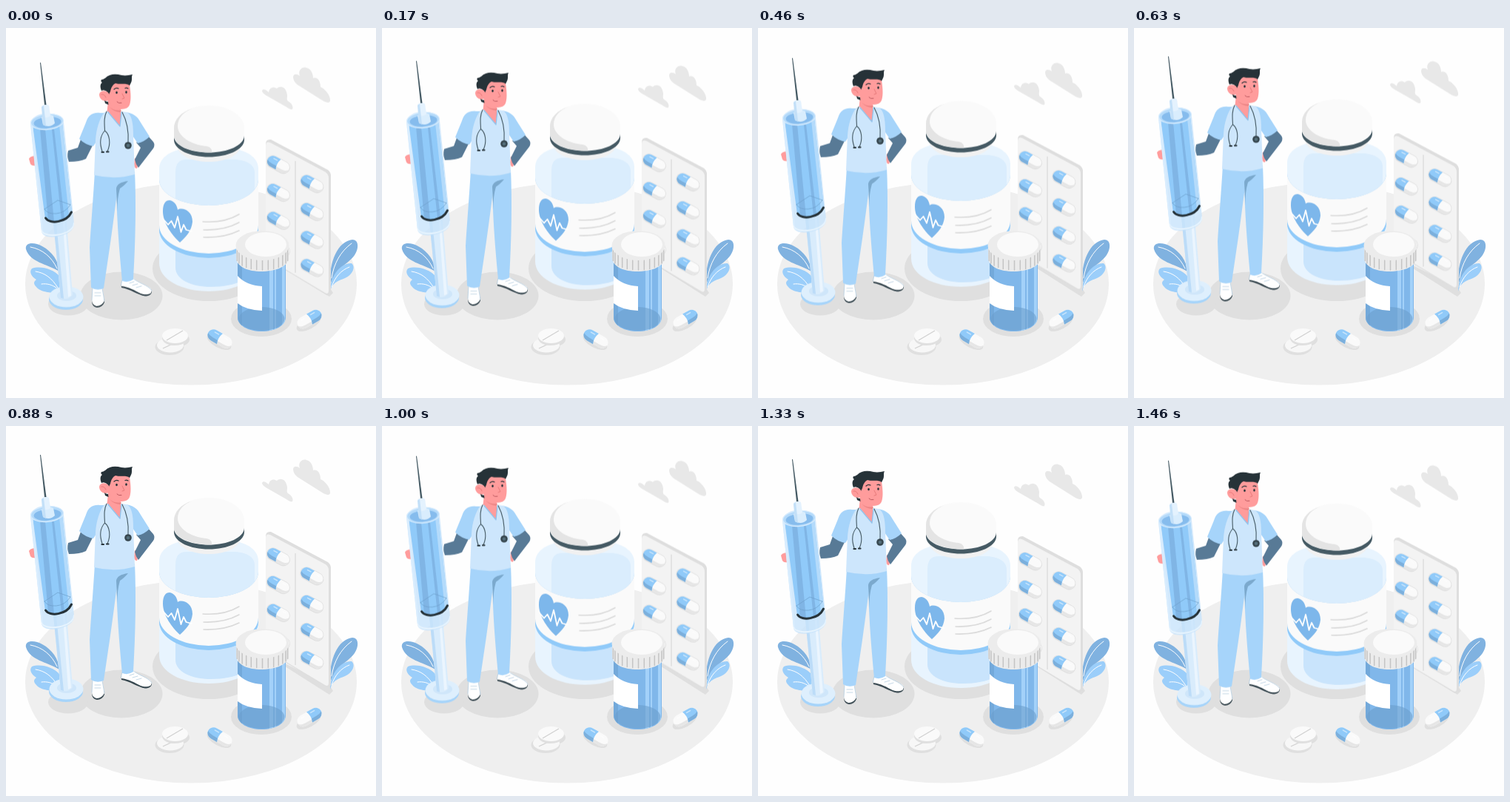
Write an HTML page that moves like this. It is 500 px wide and 500 px high and loops after 1500 ms.

```html
<!DOCTYPE html>
<html lang="en">
<head>
<meta charset="utf-8">
<title>Pharmacy</title>
<style>
html, body { margin: 0; width: 100%; height: 100%; overflow: hidden; background: #fefefe; }
svg { display: block; width: 100%; height: 100%; }
.line { fill: none; stroke-linecap: round; stroke-linejoin: round; }
</style>
</head>
<body>
<svg viewBox="0 0 500 500">
<defs>
  <g id="capsule">
    <rect x="-16" y="-7.6" width="32" height="15.2" rx="7.6" fill="#fafafa"/>
    <path d="M-1 7.6H8.4A7.6 7.6 0 0 0 16 0C14 3.5 10 4 7 4H-1Z" fill="#e6e6e6"/>
    <path d="M0-7.6H-8.4A7.6 7.6 0 0 0-8.4 7.6H0Q-3 0 0-7.6Z" fill="#90caf9"/>
    <path d="M-15.9 1A7.6 7.6 0 0 0-8.4 7.6H0Q-1.4 5-1.5 3H-8Q-13 3-15.9 1Z" fill="#7bafdc"/>
    <path class="line" d="M-9-4.2H-4M5-4.2H9" stroke="#fff" stroke-width="1.5" opacity=".5"/>
  </g>
  <g id="blisterPill">
    <rect x="-17" y="-8.3" width="34" height="17.4" rx="8.7" fill="#e0e0e0"/>
    <use href="#capsule"/>
  </g>
  <clipPath id="jar"><path d="M236 164C220 168 207 176 207 191V318C207 340 237 356 274 356S341 340 341 318V191C341 176 328 168 312 164Z"/></clipPath>
  <clipPath id="vial"><path d="M313 308V391C313 402 327 410 345.5 410S378 402 378 391V308Z"/></clipPath>
  <clipPath id="barrel"><path d="M33 130C34 120 46 115 57 116C69 116 77 120 78 128L92 264C93 274 82 280 70 282C59 284 49 282 48 275Z"/></clipPath>
</defs>

<!-- floor, shadows, leaves -->
<ellipse cx="250" cy="346" rx="224" ry="136.5" fill="#efefef"/>
<g fill="#dfdfdf">
  <ellipse cx="156" cy="362" rx="55.5" ry="32.5"/>
  <ellipse cx="84" cy="373" rx="27" ry="15.5"/>
  <ellipse cx="274" cy="325" rx="76" ry="44"/>
  <ellipse cx="345" cy="393" rx="41" ry="24"/>
  <path d="M352 309L437 363L442 358L437 350Z"/>
</g>
<g fill="#80b2e0">
  <path d="M72 329C54 318 33 317 27 299C25 289 39 289 49 295C62 302 71 314 72 329Z"/>
  <path d="M438 348C436 315 449 288 468 286C477 286 477 298 471 307C461 321 445 323 438 348Z"/>
</g>
<g fill="#9bcefa">
  <path d="M74 356C62 360 45 356 41 350C37 346 37 343 41 340C34 336 31 329 35 325C47 321 64 326 72 335Z"/>
  <path d="M438 356C438 334 453 317 467 318C473 323 468 333 460 337C450 342 442 342 438 356Z"/>
</g>
<g class="line" stroke="#fff">
  <path d="M33 296C50 299 62 310 69 325M40 329C53 331 62 338 70 351M48 346C56 345 62 347 68 351"/>
  <path d="M467 291C452 302 443 318 440 338M464 323C453 327 444 337 440 350"/>
</g>

<g id="float">
  <!-- clouds -->
  <g fill="#e8e8e8">
    <path d="M346 85C347 82 351 83 355 87C356 80 362 79 366 82C371 77 379 80 380 91C380 95 379 97 381 99C385 101 389 106 387 110C385 111 382 109 379 107L351 91C348 89 346 87 346 85Z"/>
    <path d="M388 66C389 62 393 62 397 65C394 58 400 52 406 54C412 55 415 62 415 68C421 66 425 72 425 80C431 82 439 92 438 99C437 102 433 101 429 99L394 77C390 74 388 70 388 66Z"/>
  </g>

  <!-- blister -->
  <path d="M351 157Q351 150 358 151L435 192Q439 195 439 200V356Q439 362 433 361L354 313Q351 311 351 306Z" fill="#dedede"/>
  <path d="M351 159Q351 153 357 155L432 195Q436 198 436 203V355Q436 361 431 358L354 312Q351 310 351 305Z" fill="#f3f3f3"/>
  <path d="M391 180V331" stroke="#dadada" stroke-width="1.3"/>
  <g id="pills"></g>

  <!-- jar -->
  <g clip-path="url(#jar)">
    <path d="M200 160H345V360H200Z" fill="#e8f4fe"/>
    <path d="M229 245V196C229 183 234 178 244 178H306C325 178 336 185 336 196V245Z" fill="#daedfd"/>
    <path d="M229 285V324C229 340 250 350 277 350C311 350 336 338 336 320V270Z" fill="#c9e4fc"/>
    <path d="M207 205A67 35 0 0 0 341 205V273A67 38 0 0 1 207 273Z" fill="#90caf9"/>
    <path d="M207 205A67 35 0 0 0 341 205V267A67 38 0 0 1 207 267Z" fill="#fafafa"/>
  </g>
  <path d="M235 290C225 281 212 264 212 248C212 237 216 233 221 233C227 234 231 239 232 246C237 242 252 246 252 262C251 274 243 283 235 290Z" fill="#7db7eb"/>
  <path class="line" d="M212 258L219 266L223.5 261L228 270L232 255L236.5 276L240 266L243.500 273L251 275" stroke="#fff" stroke-width="1.8"/>
  <path class="line" d="M266 262Q295 264 315 252M267 273Q295 274 315 263M267 283Q295 284 315 274" stroke="#dadada" stroke-width="1.6"/>
  <path d="M231 155V160C233 173 252 181 274 181S315 173 317 160V155Z" fill="#f1f1f1"/>
  <path d="M227 146V152C228 165 249 174.500 274 174.500S321 165 322 152V146Z" fill="#455a64"/>
  <path d="M227 136C227 118 248 105 274 105S322 118 322 136V146C321 159 300 168.500 274 168.500S227 159 227 146Z" fill="#fafafa"/>
  <path d="M227 136V146C227 159 250 168.500 278 168.500C279 164 276 161 271 160C249 158 232 146 232 133C232 121 241 113 252 109C236 114 227 124 227 136Z" fill="#e4e4e4"/>

  <!-- trousers and shoes -->
  <path d="M116 367V371Q117 377 123 378Q130 378 133 371V367Z" fill="#37474f"/>
  <path d="M117 350H130L133 369Q129 376.500 122 376Q116 374 116 368Z" fill="#fff"/>
  <path class="line" d="M117 352L116 368M130 352L133 369M120 358H128M120 362H128" stroke="#b4cde0" stroke-width=".8"/>
  <path d="M155.5 347L156 351C168 353 178 361 188 362.500C192 362.500 197 361 197 356Z" fill="#37474f"/>
  <path d="M157 339L171 337C177 344 187 346 194 351C197 353 197.500 357 195 359C191 361 186 360.500 182 359C174 355 166 350 155.500 349Z" fill="#fff"/>
  <path class="line" d="M157 340L155.500 348M171 338C178 345 192 347 197 355M167 345L173 343M171 348L178 346M176 351L183 349" stroke="#b4cde0" stroke-width=".8"/>
  <path d="M145 202L174 194C176 236 175 288 172 340Q165 345 157 342C154 309 150 270 149 216Z" fill="#a6d4fa"/>
  <path d="M120 194H162L151 216C147 247 144 270 141 291L132 352Q123 356 115 351L113 297C115 265 118 228 120 194Z" fill="#a6d4fa"/>
  <path d="M165 207Q150 209 149 217L150.500 248Q150 230 154 217Q159 214 165 207Z" fill="#7ba9cd"/>

  <!-- right arm -->
  <path d="M174 176L181 179L177 190Q173 190 173 184Z" fill="#ff9c9c"/>
  <path d="M191 145L199 154Q202 158 199 163L179 189Q175 184 174 178L182 162L176 155Z" fill="#587a96"/>
  <path d="M161 114C172 115 178 120 182 128L194 147Q187 154 178 156L169 143Z" fill="#a6d4fa"/>

  <!-- left arm -->
  <path d="M101 151L97 162L84 166Q82 174 85 181Q100 181 108 177L118 157Z" fill="#587a96"/>
  <path d="M127 115C116 114 111 119 108 128L99 150Q107 158 118 160L128 145L136 115Z" fill="#a6d4fa"/>

  <!-- neck and shirt -->
  <path d="M138 99L155 108V116L157 132L152 134L136 118Z" fill="#ff9c9c"/>
  <path d="M140 107Q147 113 156 111L155 114Q146 114 140 107Z" fill="#ec8585"/>
  <path d="M133 114L138 113L154 133L156 113L163 114C169 116 172 127 172 145L174 198Q148 206 119 199L121 151C122 137 126 123 133 114Z" fill="#cde6fc"/>
  <path class="line" d="M138 114L154 133L156 114" stroke="#90c3ec" stroke-width="1.3"/>

  <!-- stethoscope -->
  <g class="line" stroke="#455a64" stroke-width="1.1">
    <path d="M136 113C132 121 133 129 133.5 139C128 145 126 155 130 167M133.5 139C140 144 142 156 137 167M157 114C163 125 166 139 165 155"/>
    <path d="M129.500 168H132M136 167.500H138.500" stroke-width="2.2" stroke="#263238"/>
  </g>
  <circle cx="165" cy="159" r="4.8" fill="#37474f"/>
  <circle cx="165" cy="159" r="2.3" fill="#546e7a"/>

  <!-- head -->
  <path d="M137 78C148 71 163 72 167 77C169 90 169 98 167 104C165 111 152 112 143 106C138 103 136 96 136 88Z" fill="#ff9c9c"/>
  <path d="M129 85C127 80 127 76 130 74C128 73 128 71 129 70C131 70 132 69 134 68C140 62 148 62 156 64C162 65 166 64 171 63C169 66 171 70 169 74L167 78C163 74 155 77 148 75C144 77 142 81 141 86L139 90C137 85 132 83 129 85Z" fill="#263238"/>
  <path d="M139 89C136 84 127 84 126 90C126 96 132 101 138 98Z" fill="#ff9c9c"/>
  <path class="line" d="M129 90Q133 89 135 94" stroke="#e57878" stroke-width=".9"/>
  <path d="M133 98Q135 100 138 100L138.500 104L134 102Z" fill="#263238"/>
  <ellipse cx="149.500" cy="87.5" rx="1.3" ry="1.8" fill="#263238"/>
  <ellipse cx="162.500" cy="87" rx="1.3" ry="1.8" fill="#263238"/>
  <path class="line" d="M146 83Q149 80.500 152 82M161 81.500Q163 80.500 165 82" stroke="#263238" stroke-width="1.2"/>
  <path class="line" d="M157 89L160 95L157 96" stroke="#e57878" stroke-width=".9"/>
  <path class="line" d="M150 100Q152 102.500 156 101.500" stroke="#b5535a" stroke-width=".9"/>

  <!-- syringe -->
  <path d="M38 173Q32 174 31 177L33 184Q35 187 40 186Z" fill="#ff9c9c"/>
  <ellipse cx="81" cy="367" rx="23" ry="14" fill="#a6d4fa"/>
  <ellipse cx="81.5" cy="363.5" rx="23" ry="14" fill="#deeffd"/>
  <ellipse cx="82" cy="362" rx="13" ry="7" fill="#cfe6fa"/>
  <path d="M63 254L81 252L90 361Q84 369 74 365Z" fill="#d9ecfc"/>
  <path d="M63 254L67 255L78 366L74 365Z" fill="#bcdcf8"/>
  <path d="M76 254L79 254L88 362L84 364Z" fill="#ebf5fe"/>
  <g clip-path="url(#barrel)">
    <path d="M25 110H99V290H25Z" fill="#c9e4fc" opacity=".8"/>
    <path d="M36 131C42 139 69 138 76 128L89 249C84 264 60 267 53 258Z" fill="#90caf9"/>
    <path d="M46 136L53 137L65 262L57 261Z" fill="#80b5e5"/>
    <path d="M62 137L65 137L79 259L75 260Z" fill="#80b5e5"/>
    <path d="M72 131L76 128L89 248L85 254Z" fill="#b4dbfb"/>
    <path d="M33 130L36 131L50 276L47 278Z" fill="#d9edfe"/>
    <path class="line" d="M52 245L70 233L87 239M52 245Q56 252 68 251T87 239" stroke="#6c9fcb" stroke-width=".7"/>
    <path class="line" d="M53.500 257C59 266 82 263 88.500 249" stroke="#263238" stroke-width="3"/>
    <path class="line" d="M48 274C52 285 91 281 92 264" stroke="#e7f4fe" stroke-width="2"/>
  </g>
  <ellipse cx="55.500" cy="127" rx="22" ry="10.500" fill="#b4dafa" stroke="#d6ebfd" stroke-width="1.3" transform="rotate(-5 55.5 127)"/>
  <ellipse cx="56" cy="128" rx="18.500" ry="7.500" fill="#86bced" transform="rotate(-5 56 128)"/>
  <path d="M48 121Q55 114 64 119L66 129Q59 136 50 131Z" fill="#d9edfd"/>
  <path d="M48 106Q53 101 58 105L60 119Q55 123 50 120Z" fill="#e4f2fe"/>
  <path d="M48 107L51 105L54 133L50 131Z" fill="#c3e0f8"/>
  <path d="M46 47H47L54.500 104H52Z" fill="#455a64"/>
</g>

<!-- vial -->
<g clip-path="url(#vial)">
  <path d="M310 305H380V412H310Z" fill="#80b7ea"/>
  <path d="M313 305H319V412H313Z" fill="#73a9da"/>
  <path d="M356 305H361V412H356ZM363 305H365V412H363ZM373 305H377V412H373Z" fill="#a3d1f9"/>
  <ellipse cx="345.5" cy="393" rx="31" ry="16" fill="#6b9fce" opacity=".6"/>
  <path d="M313 335Q325 348 346 349V382Q324 381 313 372Z" fill="#fff"/>
</g>
<path d="M311 293V312C313 323 327 329 345 329S380 323 382 312V293Z" fill="#ebebeb"/>
<path id="ribs" class="line" stroke="#c4c4c4" stroke-width="1.5"/>
<ellipse cx="346.5" cy="294" rx="36" ry="20" fill="#ececec"/>
<ellipse cx="351" cy="292.5" rx="28" ry="16.5" fill="#fafafa"/>

<!-- loose tablets and capsules -->
<ellipse cx="221" cy="431" rx="19.500" ry="11" fill="#dfdfdf"/>
<ellipse cx="230" cy="421" rx="18" ry="10" fill="#dfdfdf"/>
<path d="M204 429V432C207 443 236 442 240 431V428Z" fill="#e0e0e0"/>
<ellipse cx="222" cy="428.5" rx="18" ry="10" fill="#f7f7f7"/>
<path d="M212 433L231 424" stroke="#d0d0d0" stroke-width="1.3"/>
<path d="M211 417V420C214 433 243 431 246 420V416Z" fill="#e0e0e0"/>
<ellipse cx="228.5" cy="416" rx="17.5" ry="10" fill="#fafafa"/>
<path d="M217 422L239 409" stroke="#d0d0d0" stroke-width="1.3"/>
<ellipse cx="288" cy="424" rx="18" ry="8" fill="#dfdfdf" transform="rotate(28 288 424)"/>
<use href="#capsule" transform="translate(289 420) rotate(30) scale(1.12 1.05)"/>
<ellipse cx="409" cy="399" rx="18" ry="8" fill="#dfdfdf" transform="rotate(-28 409 399)"/>
<use href="#capsule" transform="translate(410 393.5) rotate(-30) scale(-1.12 1.05)"/>
</svg>
<script>
const $ = id => document.getElementById(id);

const column = (x, y) => [0, 1, 2, 3].map(i =>
  `<use href="#blisterPill" transform="translate(${x} ${y + i * 37.8}) rotate(28)"/>`).join('');
$('pills').innerHTML = column(368, 184.5) + column(413.5, 210.5);

// Ridges follow the curved side of the cap.
let ribs = '';
for (let i = 1; i < 14; i++) {
  const a = Math.PI * i / 14;
  const x = 346.5 - 35 * Math.cos(a);
  ribs += `M${x} ${295 + 19 * Math.sin(a)}V${311 + 16 * Math.sin(a)}`;
}
$('ribs').setAttribute('d', ribs);

// Linear rise and fall of 10 units, sampled 36 times per loop.
const lift = y => ({ transform: `translateY(${y}px)` });
$('float').animate([
  { offset: 0, ...lift(-0.28), easing: 'steps(18)' },
  { offset: 0.5, ...lift(-10.28) },
  { offset: 0.5, ...lift(-9.72), easing: 'steps(18)' },
  { offset: 1, ...lift(0.28) }
], { duration: 1500, delay: -4, iterations: Infinity });
</script>
</body>
</html>
```
